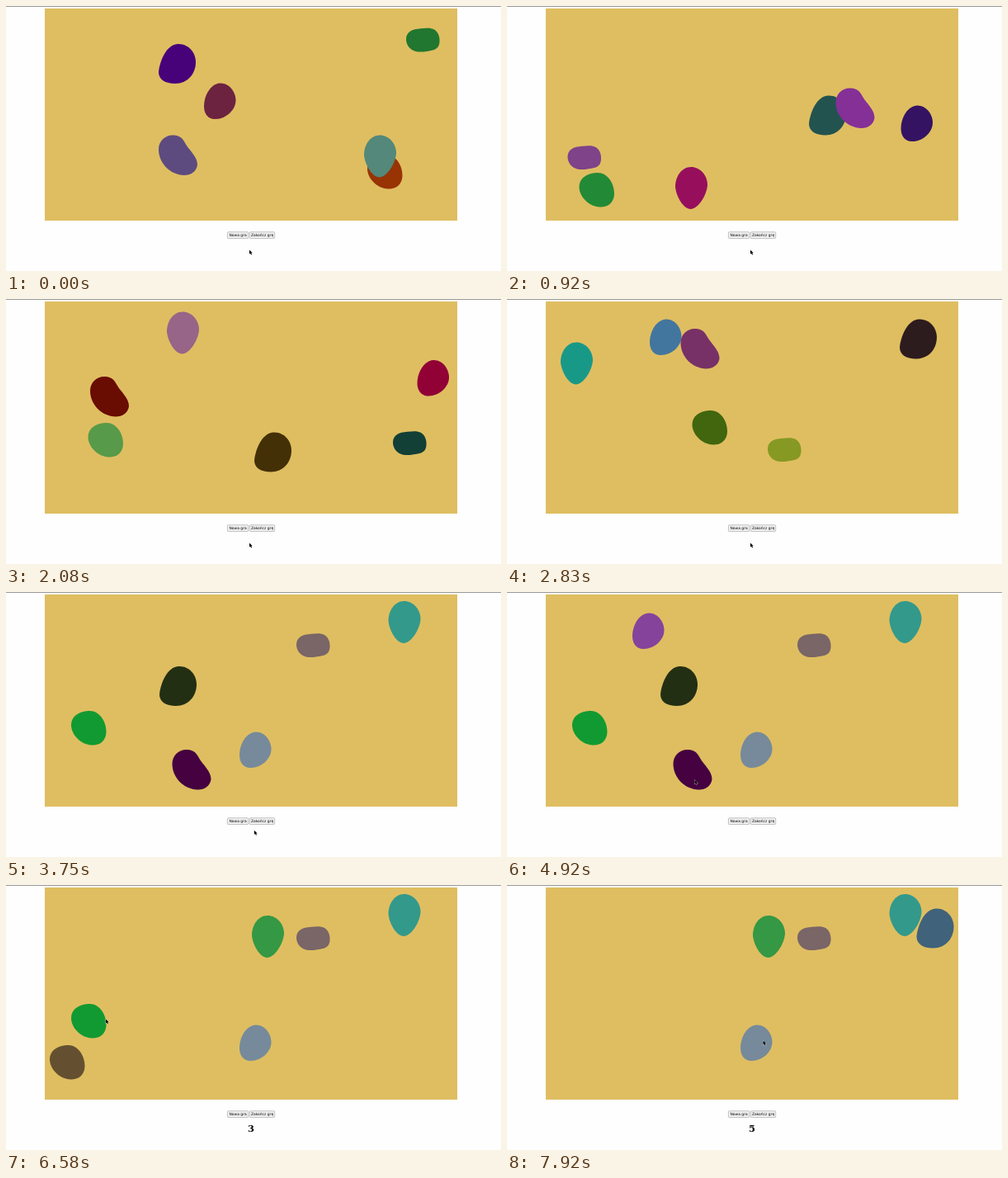
Recreate the animation shown at these times as an HTML page. Size 600x321 px, loop 8 s.

```html
<!DOCTYPE html>
<html lang="pl">
<head>
<meta charset="utf-8">
<style>
html, body { margin: 0; width: 100%; height: 100%; overflow: hidden; background: #fefefe; }
svg { display: block; width: 100%; height: 100%; }
.label { font: 4.44px "DejaVu Sans", sans-serif; text-anchor: middle; fill: #000; }
#score { font: bold 11.4px "DejaVu Serif", "Noto Serif", serif; text-anchor: middle; fill: #000; }
.button { fill: #efefef; stroke: #858585; stroke-width: .45; }
</style>
</head>
<body>
<svg viewBox="0 0 600 321">
  <rect width="600" height="321" fill="#fefefe"/>
  <rect width="600" height="1" fill="#999"/>
  <rect x="47" y="3" width="500" height="257" fill="#dfbe61"/>
  <g id="blobs"></g>
  <rect class="button" x="268.4" y="273.7" width="25.4" height="7.8" rx="1"/>
  <rect class="button" x="295.3" y="273.7" width="30.4" height="7.8" rx="1"/>
  <text class="label" x="281.1" y="279.2">Nowa gra</text>
  <text class="label" x="310.5" y="279.2">Zakończ grę</text>
  <text id="score" x="297" y="299.3"></text>
  <path id="cursor" d="M0 0V5.1L1.2 4.1L2.1 6L3 5.6L2.2 3.8H3.8Z" fill="#000" stroke="#fff" stroke-width=".55" paint-order="stroke"/>
</svg>
<script>
const LOOP = 8000, TICK = 1000 / 12;

// Blob outlines, measured from their top left corner
const shapes = {
  A: 'M24 0C37 0 45 11 45 22C45 36 35 48 20 48C8 48 0 43 0 34C1 22 9 0 24 0Z',
  B: 'M18 .8C25 0 30 -.3 34 2C39 5 41 11 40.5 17C40 24 36 26.5 30 27.5C23 29 14 30 9 27.5C3 25 0 19 0 14C0 5 7 1.5 18 .8Z',
  C: 'M20 0C31 0 38.5 11 38.5 21C38.5 32 27 43.5 13.5 43.5C4 43.5 0 36 0 28C0 14 9 0 20 0Z',
  E: 'M21 0C34 -1 43 13 42.5 26C42 37 34 42 25 41.5C12 41 0 29 0 17C0 7 9 .5 21 0Z',
  D: 'M19 0C30 0 39 10 39 22C38 35 27 51 18.5 51C10 51 1 36 0 24C0 11 8 0 19 0Z',
  F: 'M17 0C26 -.5 30 5 33 11C37 18 47 26 47 36C46 44 39 48.5 31 48.5C14 48 0 34 0 17C0 7 8 0 17 0Z'
};

// Each new game: start time, then blobs as "shape x y colour [click time]"
const games = [
  [0, 'A 185 46 #470179', 'B 485 26.5 #21772f', 'C 240 93.5 #6b2340', 'E 438 180 #983304', 'D 434 156.5 #53887a', 'F 185 156.5 #5d4b80'],
  [830, 'A 366 108.5 #23534f', 'B 73.5 169 #7e4389', 'C 477.5 120.5 #341363', 'E 87.5 202 #228a36', 'D 204 195 #970f5c', 'F 398.5 99.5 #853097'],
  [1500, 'A 301 161.5 #443006', 'B 469 160 #123f36', 'C 498.5 74 #910136', 'E 99.5 150 #579a49', 'D 195 15.5 #976587', 'F 102 94 #690c02'],
  [2170, 'A 330 173 #5b3a78', 'B 486 92 #317a70', 'C 143 118 #8c2a3c', 'E 240 60 #3b5f92', 'D 402 17.5 #7b8a2c', 'F 90 160 #27483b'],
  [2750, 'A 476 24.5 #2d1c1d', 'B 316 168 #869923', 'C 173 24.5 #43769e', 'E 224.5 135 #41660e', 'D 65 52.5 #189988', 'F 210.5 36 #783166'],
  [3420, 'A 186 90 #232f13 5670', 'B 352 50 #7a6567', 'C 283 169.5 #768a9b', 'E 79 144 #119a31 6750', 'D 463.5 11 #33998b', 'F 201.5 191 #450140 5170']
];

// Extra blobs join the last game once a second
const extras = [
  [4420, 'C 152 25.5 #86439b 6170'],
  [5420, 'E 53 194 #645030 7330'],
  [6420, 'D 298 37 #359844'],
  [7420, 'A 496.5 28.5 #40627a']
];

// Pointer stops: time, x, y
const stops = [
  [0, 295, 295.5], [3600, 295, 295.5], [3920, 308, 280.5], [4000, 308, 280],
  [4800, 227.5, 227.5], [5250, 227.5, 227.5], [5580, 210, 115], [5750, 210, 115],
  [6080, 172, 50], [6250, 172, 50], [6570, 121, 162.5], [6900, 107, 165],
  [7000, 107, 165], [7300, 78, 212], [7400, 78, 212], [7910, 310.5, 188.5], [8000, 310.5, 188.5]
];

const layer = document.getElementById('blobs');
const score = document.getElementById('score');
const cursor = document.getElementById('cursor');

function makeBlob(text, from, end) {
  const [shape, x, y, fill, click] = text.split(' ');
  const el = document.createElementNS('http://www.w3.org/2000/svg', 'path');
  el.setAttribute('d', shapes[shape]);
  el.setAttribute('transform', `translate(${x} ${y})`);
  el.setAttribute('fill', fill);
  layer.append(el);
  return { el, from, to: click ? +click : end, clicked: !!click };
}

const blobs = games.flatMap(([from, ...items], i) => {
  const end = i + 1 < games.length ? games[i + 1][0] : LOOP;
  return items.map(item => makeBlob(item, from, end));
}).concat(extras.map(([from, item]) => makeBlob(item, from, LOOP)));

const ease = p => p * p * (3 - 2 * p);

function pointerAt(t) {
  const i = Math.max(1, stops.findIndex(s => s[0] >= t));
  const [t0, x0, y0] = stops[i - 1], [t1, x1, y1] = stops[i];
  const p = ease((t - t0) / (t1 - t0));
  return [x0 + (x1 - x0) * p, y0 + (y1 - y0) * p];
}

function draw(t) {
  for (const b of blobs) b.el.style.display = t >= b.from && t < b.to ? '' : 'none';
  score.textContent = blobs.filter(b => b.clicked && t >= b.to).length || '';
  const [x, y] = pointerAt(Math.floor((t + 4) / TICK) * TICK);
  cursor.setAttribute('transform', `translate(${x} ${y})`);
}

const start = performance.now();
function loop(now) {
  draw(Math.max(0, now - start) % LOOP);
  requestAnimationFrame(loop);
}
draw(0);
requestAnimationFrame(loop);
</script>
</body>
</html>
```
